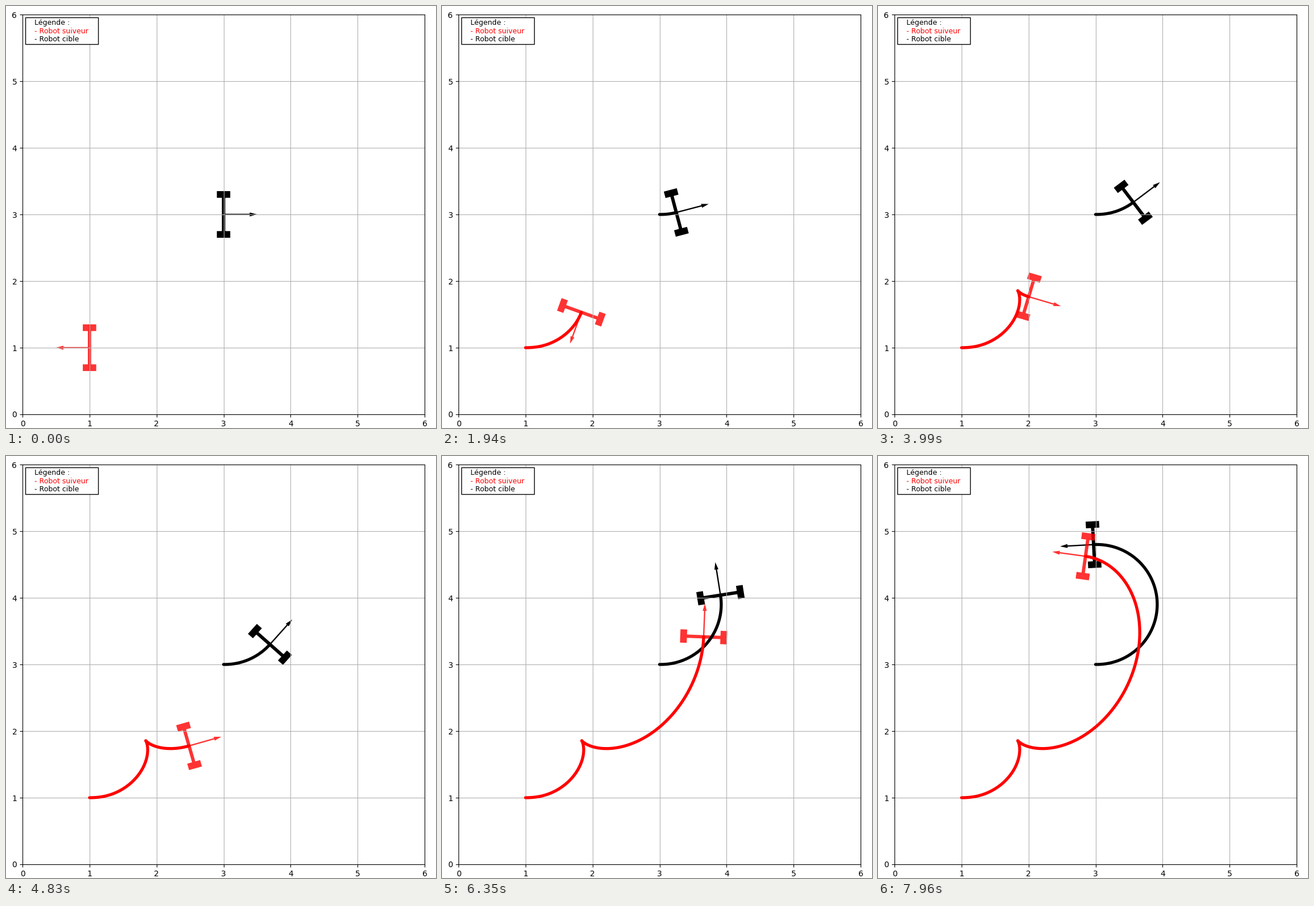
Animation, 756 px wide and 741 px high, one loop 7.99 s. Source, as a matplotlib script:

```python
import numpy as np
import matplotlib.pyplot as plt
from matplotlib.animation import FuncAnimation
from matplotlib.patches import PathPatch, Rectangle
from matplotlib.path import Path

W, H, DPI = 756, 741, 100
LOOP, TICK = 7990, 34

plt.rcParams["font.family"] = "DejaVu Sans"

# the simulation runs slowly at first, then speeds up: time (ms) -> step
CLOCK_MS = [0, 3400, 4970, 5820, 6610, 7960]
CLOCK_STEP = [0, 38, 62, 86, 137, 217]
LAST = CLOCK_STEP[-1]

RADIUS = 0.9                # leader's circle
TURN = np.radians(0.859)    # leader's turn per step
LAG = 3.8                   # steps before the leader starts to turn
GAIN = 0.0195               # follower's speed per unit of gap
END_GAP = np.radians(11)    # heading difference that remains


def leader(n):
    """A short straight start, then a circle."""
    a = TURN * max(n - LAG, 0)
    x = 3 + 0.02 * min(n / LAG, 1) + RADIUS * np.sin(a)
    return x, 3 + RADIUS * (1 - np.cos(a)), a


def follower_heading(n):
    """Starts opposite to the leader and turns round towards its heading."""
    fade = np.exp(-0.0105 * n - 0.0004 * n**2)
    gap = END_GAP + (np.pi - END_GAP) * fade
    return 2 * np.pi + leader(n)[2] - gap


def follower_poses():
    """Drive along the heading, with a speed set by the gap ahead."""
    x, y = 1.0, 1.0
    poses = []
    for n in range(LAST + 1):
        poses.append((x, y, follower_heading(n)))
        lx, ly, la = leader(n + 0.5)
        a = follower_heading(n + 0.5)
        ahead = (lx - x) * np.cos(a) + (ly - y) * np.sin(a)
        cruise = RADIUS * TURN * min(n / 15, 1)
        v = GAIN * ahead + cruise * np.cos(la - a)
        x += v * np.cos(a)
        y += v * np.sin(a)
    return poses


def box(cy, w, h):
    return [(-w / 2, cy - h / 2), (w / 2, cy - h / 2),
            (w / 2, cy + h / 2), (-w / 2, cy + h / 2)]


def robot_shape():
    arrow = [(0, -0.01), (0.39, -0.01), (0.39, -0.03), (0.5, 0),
             (0.39, 0.03), (0.39, 0.01), (0, 0.01)]
    parts = [box(0.3, 0.2, 0.1), box(-0.3, 0.2, 0.1), box(0, 0.05, 0.52), arrow]
    verts, codes = [], []
    for p in parts:
        verts += p + [p[0]]
        codes += [Path.MOVETO] + [Path.LINETO] * (len(p) - 1) + [Path.CLOSEPOLY]
    return np.array(verts), codes


VERTS, CODES = robot_shape()


def placed(x, y, a):
    c, s = np.cos(a), np.sin(a)
    return Path(VERTS @ np.array([[c, s], [-s, c]]) + (x, y), CODES)


fig = plt.figure(figsize=(W / DPI, H / DPI), dpi=DPI, facecolor="white")
ax = fig.add_axes([29 / W, 24 / H, 707 / W, 702 / H])
ax.set(xlim=(0, 6), ylim=(0, 6), xticks=range(7), yticks=range(7))
ax.grid(True)

ax.add_patch(Rectangle((0.04, 5.555), 1.09, 0.4, fc="white", ec="black", zorder=3))
for base, label, color in [(33.4, "Légende :", "black"),
                           (47.8, "- Robot suiveur", "red"),
                           (61.8, "- Robot cible", "black")]:
    fig.text(50 / W, 1 - base / H, label, color=color, fontsize=9, va="baseline")


class Robot:
    def __init__(self, poses, color, alpha):
        self.poses = np.array(poses)
        self.body = PathPatch(placed(*self.poses[0]), fc=color, ec="none", alpha=alpha)
        ax.add_patch(self.body)
        self.trail, = ax.plot([], [], color=color, lw=3.8, solid_capstyle="round",
                              solid_joinstyle="round")

    def show(self, n):
        self.body.set_path(placed(*self.poses[n]))
        done = self.poses[:n + 1] if n else self.poses[:0]
        self.trail.set_data(done[:, 0], done[:, 1])
        return [self.body, self.trail]


robots = [Robot([leader(n) for n in range(LAST + 1)], "black", 1),
          Robot(follower_poses(), "red", 0.8)]


def draw(i):
    t = (i + 0.5) * TICK
    n = int(np.interp(t, CLOCK_MS, CLOCK_STEP) + 0.05)
    return [artist for r in robots for artist in r.show(n)]


def reset():
    return draw(0)


anim = FuncAnimation(fig, draw, frames=LOOP // TICK, init_func=reset,
                     interval=TICK, repeat=True, repeat_delay=0)
plt.show()
```
